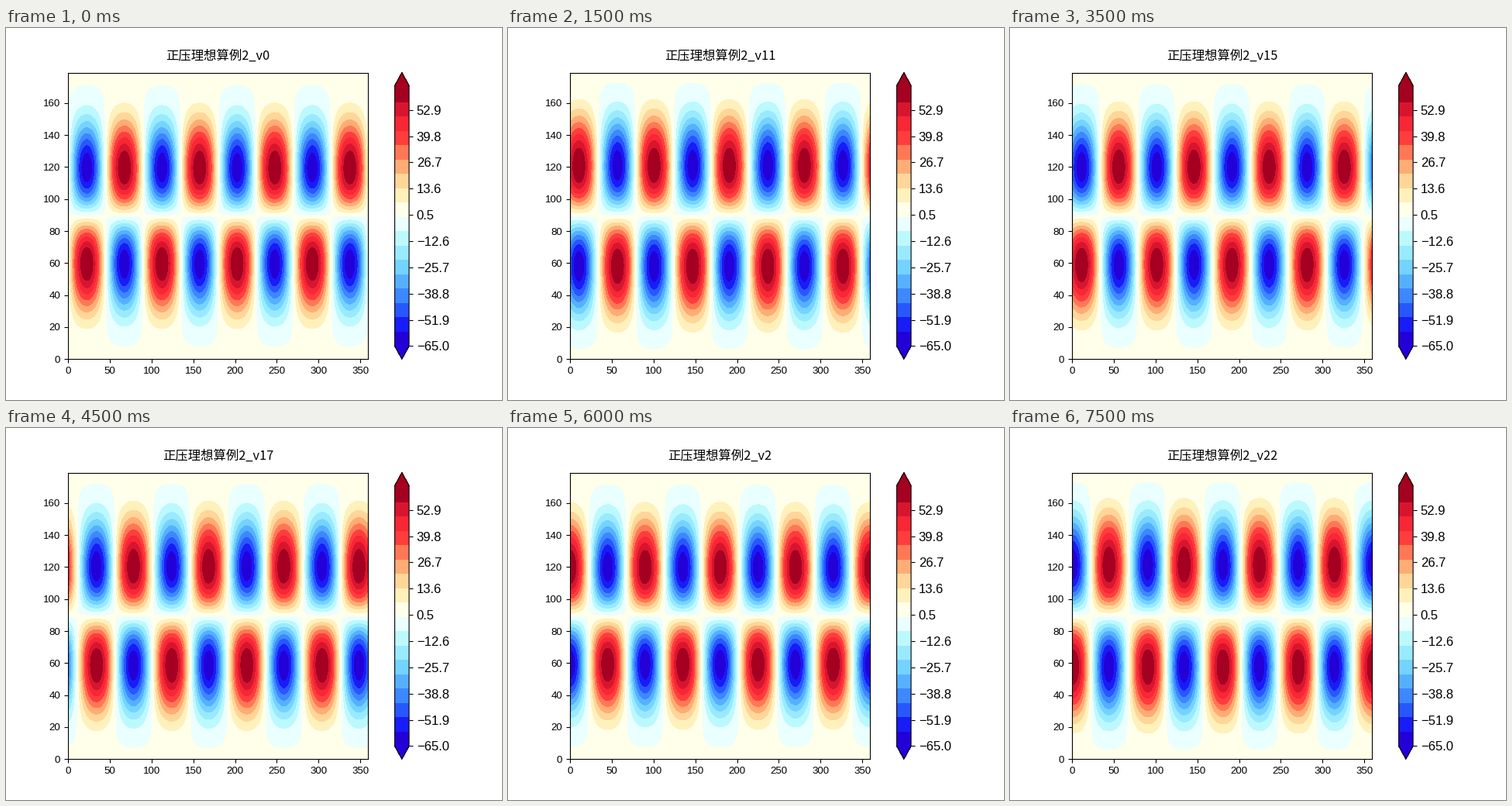
Animation, 640 px wide and 480 px high, one loop 8 s. Source, as a matplotlib script:

```python
import numpy as np
import matplotlib.pyplot as plt
from matplotlib.animation import FuncAnimation
from matplotlib.cm import ScalarMappable
from matplotlib.colors import BoundaryNorm, ListedColormap

plt.rcParams["font.family"] = "Liberation Sans"

COLORS = [
    "#2400d8", "#181cf7", "#2857ff", "#3d87ff", "#56b0ff", "#75d3ff",
    "#99eaff", "#bcf9ff", "#eaffff", "#ffffea", "#fff1bc", "#ffd699",
    "#ffac75", "#ff7856", "#ff3d3d", "#f72735", "#d8152f", "#a50021",
]
BOUNDS = np.linspace(-65, 64, 19)
BOUNDS[-1] = 65

# Steps play in alphabetical order: 0, 1, 10, ..., 19, 2, 20, 21, 22
STEPS = sorted(range(23), key=str)[:16]
DRIFT = 11.25  # degrees eastward per step

x = np.arange(360)
y = np.arange(180)
lat = np.radians(np.linspace(-90, 90, 180))[:, None]


def wind(step):
    """Meridional wind of a wavenumber-4 planetary wave."""
    swing = 0.65 - 0.35 * np.cos(2 * np.pi * (step - 15) / 13)
    bend = swing * (1 - np.exp(-step / 2))
    n = 3 - 0.42 * bend
    profile = np.sin(lat) * np.abs(np.cos(lat)) ** n
    peak = np.sqrt(1 / (n + 1)) * (n / (n + 1)) ** (n / 2)
    phase = np.radians(4 * (x - 67.5 - DRIFT * step))
    return 64.95 * profile / peak * np.cos(phase + 0.06 * bend * np.cos(phase))


fig, ax = plt.subplots(figsize=(6.4, 4.8), dpi=100)
bar = fig.colorbar(
    ScalarMappable(BoundaryNorm(BOUNDS, len(COLORS)), ListedColormap(COLORS)),
    ax=ax, pad=0.07, extend="both", spacing="proportional",
)
ticks = -65 + 13.1 * np.arange(10)
bar.set_ticks(ticks, labels=[f"{t:.1f}".replace("-", "\u2212") for t in ticks])
bar.minorticks_off()
bar.ax.tick_params(labelsize=12)

ax.set(xlim=(0, 359), ylim=(0, 179),
       xticks=range(0, 351, 50), yticks=range(0, 161, 20))
ax.tick_params(labelsize=9.5)
title = ax.set_title("", fontname="Noto Sans CJK JP", fontsize=11.8, pad=12)
fills = []


def draw(i):
    while fills:
        fills.pop().remove()
    step = STEPS[i]
    fills.append(ax.contourf(x, y, wind(step), levels=BOUNDS[1:-1],
                             colors=COLORS, extend="both"))
    title.set_text(f"正压理想算例2_v{step}")
    return fills


anim = FuncAnimation(fig, draw, frames=len(STEPS), interval=500,
                     init_func=lambda: [], repeat=True)
plt.show()
```
